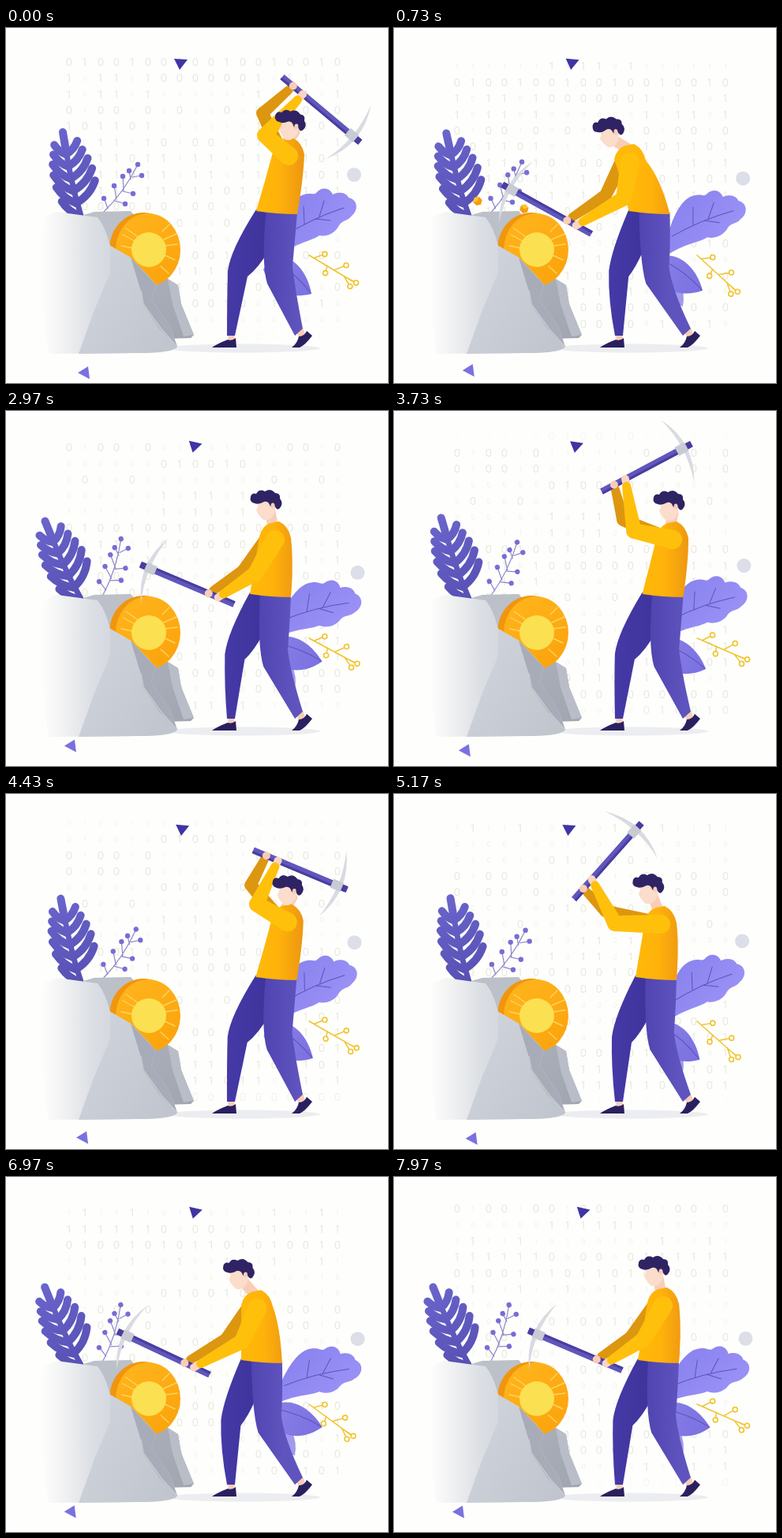
These frames come from a looping animation (484x450 px, 8000 ms). An HTML page with a canvas:

```html
<!DOCTYPE html>
<html lang="en">
<head>
<meta charset="utf-8">
<title>Coin miner</title>
<style>
html, body { margin: 0; width: 100%; height: 100%; overflow: hidden; background: #fefefc; }
canvas { display: block; width: 484px; height: 450px; }
</style>
</head>
<body>
<canvas id="stage" width="484" height="450"></canvas>
<script>
const ctx = document.getElementById('stage').getContext('2d');
const LOOP = 8000, SWING = 5000, TAU = Math.PI * 2, RAD = Math.PI / 180;
const PAPER = '#fefefc';

// time, waist x, neck x y, head x y tilt, handle x y angle, front elbow x y, back elbow x y
const POSES = [
  [0,    343,   355, 143, 361, 116,   8,  350, 62,     40, 328, 136, 325, 108],
  [170,  332,   335, 146, 323, 113,   0,  228, 133,   -48, 280, 164, 268, 148],
  [420,  326,   306, 150, 284, 121,   -6, 243, 252,  -143, 282, 212, 262, 205],
  [730,  323.5, 296, 151, 272, 125,   -8, 250, 261,  -151, 291, 216, 268, 212],
  [2070, 324,   317, 147, 298, 115.5, 0,  259, 250,  -155, 300, 208, 280, 205],
  [2970, 335,   338, 144, 330, 112,   0,  289, 245,  -157, 316, 206, 300, 203],
  [3730, 340.5, 350, 144, 349, 113,   0,  263, 102,   -28, 304, 152, 290, 138]
];

const poseRow = i => {
  const n = POSES.length, turn = Math.floor(i / n);
  const row = POSES[i - turn * n].slice();
  row[0] += turn * SWING;
  return row;
};

// Monotone cubic through the poses, so extremes are never overshot.
function poseAt(t) {
  let i = POSES.length - 1;
  while (POSES[i][0] > t) i--;
  const [a, b, c, d] = [-1, 0, 1, 2].map(k => poseRow(i + k));
  const h = c[0] - b[0], u = (t - b[0]) / h;
  const slope = (p, q, k) => (q[k] - p[k]) / (q[0] - p[0]);
  const tangent = (s1, s2) => s1 * s2 <= 0 ? 0 : 2 * s1 * s2 / (s1 + s2);
  return b.map((v, k) => {
    if (!k) return t;
    const mid = slope(b, c, k);
    const m1 = tangent(slope(a, b, k), mid) * h, m2 = tangent(mid, slope(c, d, k)) * h;
    return v * (1 + 2 * u) * (1 - u) ** 2 + m1 * u * (1 - u) ** 2 +
      c[k] * u * u * (3 - 2 * u) + m2 * u * u * (u - 1);
  });
}

const lerp = (a, b, u) => a + (b - a) * u;
const clamp = v => Math.max(0, Math.min(1, v));
const hash = (a, b) => { const v = Math.sin(a * 127.1 + b * 311.7 + 7) * 43758.5; return v - Math.floor(v); };

function fill(path, color) {
  ctx.fillStyle = color;
  ctx.fill(new Path2D(path));
}
function line(path, color, width = 1) {
  ctx.strokeStyle = color;
  ctx.lineWidth = width;
  ctx.stroke(new Path2D(path));
}
function oval(x, y, rx, ry, color, turn = 0) {
  ctx.fillStyle = color;
  ctx.beginPath();
  ctx.ellipse(x, y, rx, ry, turn, 0, TAU);
  ctx.fill();
}
const disc = (x, y, r, color) => oval(x, y, r, r, color);
function ramp(x1, y1, x2, y2, ...colors) {
  const g = ctx.createLinearGradient(x1, y1, x2, y2);
  colors.forEach((c, i) => g.addColorStop(i / (colors.length - 1), c));
  return g;
}
function turned(x, y, degrees, draw) {
  ctx.save();
  ctx.translate(x, y);
  ctx.rotate(degrees * RAD);
  ctx.translate(-x, -y);
  draw();
  ctx.restore();
}
function taper(a, b, ra, rb, color) {
  const dir = Math.atan2(b[1] - a[1], b[0] - a[0]), q = Math.PI / 2;
  ctx.fillStyle = color;
  ctx.beginPath();
  ctx.arc(a[0], a[1], ra, dir + q, dir - q);
  ctx.arc(b[0], b[1], rb, dir - q, dir + q);
  ctx.fill();
}

function rain(t) {
  const drop = t * 0.0355;
  ctx.textAlign = 'center';
  ctx.textBaseline = 'middle';
  ctx.fillStyle = '#cfcebc';
  for (let col = 0; col < 18; col++) {
    const block = Math.floor(col / 6) % 2, kind = col % 3 === 1 ? 1 : 0;
    const seed = kind + block * 2;
    for (let k = -15; k < 18; k++) {
      const y = 44 + k * 20.4 + drop;
      if (y < 32 || y > 392) continue;
      const lead = k === 0 && seed === 0, big = lead || hash(k, seed) > 0.55;
      ctx.globalAlpha = (big ? 0.45 : 0.28) * clamp((y - 30) / 10) * clamp((394 - y) / 16);
      ctx.font = (big ? 14.5 : 9) + 'px "Open Sans", sans-serif';
      ctx.fillText(lead || hash(k + 40, seed) > 0.45 ? '0' : '1', 80 + col * 20, y);
    }
  }
  ctx.globalAlpha = 1;
}

function floaters(s) {
  const tx = lerp(221, 241, s);
  turned(tx, 44, s * 10, () => fill(`M${tx - 8} 39L${tx + 9} 40L${tx - 1} 53Z`, '#4034a4'));
  const bx = lerp(99, 80, s), by = lerp(437, 423, s);
  fill(`M${bx - 8} ${by}L${bx + 5} ${by - 8}L${bx + 7} ${by + 8}Z`, '#7a70e0');
  disc(lerp(441, 446, s), lerp(186, 207, s), 9, '#dcdee8');
}

function rightPlants(s, t) {
  fill('M338 300Q372 318 366 353Q332 344 330 308Z', '#a09aec');
  turned(340, 290, -23 * s, () => {
    fill('M335 290C360 284 381 305 387 337C360 344 335 334 326 306Z', ramp(335, 290, 387, 337, '#8a80e8', '#7a70e0'));
    line('M340 294Q368 312 386 336', '#5d53b8');
  });
  turned(350, 268, 12 * s, () => {
    fill('M346 266C352 238 362 215 378 211C387 208 390 213 394 208C402 200 411 204 414 211' +
      'C424 206 432 210 434 215C447 218 446 232 438 238C433 245 427 243 422 250' +
      'C417 261 405 265 397 263C385 271 372 271 350 286Z', ramp(360, 210, 430, 260, '#8a82ee', '#9a92f6'));
    line('M352 264Q388 241 428 228M378 248L377 226M397 239L403 219M392 242L411 244', '#5d53b8');
  });
  const sway = 0.5 + 12 * Math.cos(TAU * (t - 1400) / 4500);
  turned(384, 288, sway, () => {
    line('M384 288L437 325M390 292L404 288M406 303L403 312M414 309L430 304M426 317L433 331M430 320L441 327', '#f0c42c', 1.5);
    [[404, 288], [403, 312], [430, 304], [441, 327], [433, 331]].forEach(([x, y]) => {
      disc(x, y, 3.8, '#f0c42c');
      disc(x, y, 2.2, PAPER);
    });
  });
}

function leftPlants(s) {
  turned(95, 238, -14 * s, () => {
    const color = ramp(60, 130, 100, 235, '#6a65cc', '#5850b4');
    line('M95 238Q80 190 73 133', color, 7);
    line('M72 132L75 150', color, 10);
    for (let i = 0; i < 6; i++) {
      const y = 160 + i * 15.5, x = 76 + i * 2.6 + i * i * 0.15, n = Math.min(19 + i * 5, 32);
      const left = i > 4 ? 22 : n * 0.78;
      line(`M${x} ${y}Q${x - left * 0.6} ${y - left * 0.2} ${x - left} ${y - left * 0.8}`, color, 10);
      if (i < 5) line(`M${x} ${y}Q${x + n * 0.55} ${y - n * 0.3} ${x + n * 0.75} ${y - n * 0.9}`, color, 10);
    }
  });
  turned(122, 235, -20 * s, () => {
    line('M122 235Q150 208 167 173M160 189L172 187M158 192L156 181M149 206L148 187M148 207L161 210' +
      'M140 217L137 200M138 219L151 223M129 229L124 215', '#8d86c8', 1.2);
    [[167, 173], [172, 187], [156, 181], [148, 188], [161, 210], [137, 200], [151, 223], [124, 216]]
      .forEach(([x, y]) => disc(x, y, 3.2, '#776dd4'));
  });
}

function coin() {
  oval(174, 280, 43, 46, '#f0960e');
  oval(180, 281, 41, 46, ramp(150, 240, 215, 320, '#ffb41c', '#fba30c'));
  line('M148 262L163 270M152 254L166 264M146 276L160 279M200 268L216 261M202 276L217 274' +
    'M201 288L214 294M198 258L207 249M196 302L206 311', '#ffd45c', 1.4);
  disc(181, 281, 22, '#fbe052');
}

function backRock() {
  fill('M98 237L112 233L158 232L168 244L140 290L110 260Z', '#bcc0c8');
  fill('M172 322L205 318L218 326L222 350L238 389L234 393L200 394Z', ramp(180, 320, 235, 395, '#a9aeb9', '#a0a5b0'));
  fill('M205 318L218 326L222 350L238 389L225 391L211 350Z', '#b9bdc7');
}

function frontRock() {
  fill('M48 240L64 233L116 240Q126 252 132 276L158 291L182 316L190 325L184 344L208 378' +
    'L217 404Q212 412 165 412L54 413Q40 330 48 240Z', ramp(45, 0, 140, 0, PAPER, '#eff0f1', '#dcdfe4', '#d2d6de'));
  fill('M132 276L158 291L182 316L172 334L175 350L198 382L217 404Q212 412 165 412L92 413L111 360L132 310Z',
    ramp(100, 330, 215, 400, '#ced2db', '#c0c5cd'));
  fill('M158 291L190 325L184 344L208 378L217 404L195 382L173 350L171 334Z', '#a7acb8');
  line('M171 333L174 350L197 382L216 403', '#c6cccf', 1.5);
}

function chips(t) {
  const age = (t - 400) / 1000;
  if (age < 0 || age > 0.6) return;
  ctx.globalAlpha = clamp((0.6 - age) * 5);
  [[-133, -115], [45, -85]].forEach(([vx, vy]) => {
    const x = 150 + vx * age, y = 230 + vy * age + 250 * age * age;
    turned(x, y, vx * age, () => {
      fill(`M${x - 5} ${y - 3}L${x} ${y - 6}L${x + 5} ${y - 3}V${y + 3}L${x} ${y + 6}L${x - 5} ${y + 3}Z`, '#f0a00c');
      fill(`M${x - 5} ${y - 3}L${x} ${y - 6}L${x + 5} ${y - 3}L${x} ${y}Z`, '#fbc634');
    });
  });
  ctx.globalAlpha = 1;
}

function pick(x, y, angle) {
  ctx.save();
  ctx.translate(x, y);
  ctx.rotate(angle * RAD);
  fill('M0 -4H128V4H0Z', '#6056bc');
  fill('M0 1H128V4H0Z', '#483e9f');
  fill('M109 -45Q134 0 109 45Q123 0 109 -45Z', '#d9dbe2');
  fill('M108 -6H122V6H108Z', '#c8cad4');
  fill('M122 -4H129V4H122Z', '#483e9f');
  ctx.restore();
}

function legs(w) {
  const shift = w - 343, lk = 281 + shift * 0.45, rk = 363 + shift * 0.75, ik = 326 + shift * 0.6;
  const skin = '#f8cdb8', shoe = '#2a2060';
  fill('M281 386H290L289 398H282Z', skin);
  fill('M367 384L376 380L380 390L372 394Z', skin);
  fill('M261 405Q268 400 281 395Q286 397 291 393L292 405Z', shoe);
  fill('M362 405Q369 400 371 391Q378 391 381 384L388 390Q379 402 372 405Z', shoe);
  fill(`M${w - 26} 230Q${lk + 3} 282 ${lk} 308Q${lk - 1} 345 280 390H290L${lk + 25} 315Q${w - 8} 292 ${w + 10} 232Z`,
    ramp(lk, 300, w + 5, 300, '#4539a6', '#3d3298'));
  fill(`M${w - 13} 229L${w + 26} 234Q${rk + 2} 280 ${rk} 302Q${rk + 3} 330 376 381L366 390L${ik + 5} 324Q${ik - 3} 298 ${w - 13} 229Z`,
    ramp(w - 18, 0, w + 28, 0, '#4f43b0', '#5f54be'));
}

function head(x, y, tilt) {
  turned(x, y, tilt, () => {
    ctx.save();
    ctx.translate(x, y);
    fill('M-10 -2L-11 9L-13 14Q-9 22 -4 26Q5 28 10 18L13 4L4 -5Z', '#fcdcca');
    fill('M-15 5Q-22 4 -20 -4Q-18 -9 -13 -7Q-9 -14 -2 -10Q5 -15 11 -8Q18 -8 17 -1Q22 5 17 11Q14 14 12 11' +
      'L8 5Q6 12 4 7Q2 2 -3 3Q-10 7 -15 5Z', '#2f2364');
    oval(8, 8, 2.5, 3.5, '#f8cdb8');
    ctx.restore();
  });
}

function torso(w, x, y) {
  fill(`M${w - 26} 232Q${lerp(w - 26, x - 16, 0.5)} 195 ${x - 17} ${y + 15}Q${x - 14} ${y + 2} ${x - 3} ${y - 2}` +
    `L${x + 8} ${y - 4}Q${x + 20} ${y + 2} ${x + 23} ${y + 17}Q${lerp(x + 29, w + 27, 0.5)} 190 ${w + 26} 236Q${w} 236 ${w - 26} 232Z`,
    ramp(w - 26, 0, w + 32, 0, '#ffb908', '#ffb20a', '#ee9812'));
}

function miner(t) {
  const [, w, nx, ny, hx, hy, tilt, px, py, angle, fx, fy, bx, by] = poseAt(t % SWING);
  const raised = clamp((angle + 130) / 70);
  const grip = d => [px + Math.cos(angle * RAD) * d, py + Math.sin(angle * RAD) * d];
  const front = grip(lerp(22, 34, raised)), back = grip(lerp(35, 18, raised));
  const arm = (shoulder, elbow, hand, r, color) => {
    const wrist = [lerp(elbow[0], hand[0], 0.86), lerp(elbow[1], hand[1], 0.86)];
    taper(wrist, hand, 4.5, 5, '#fbd5c2');
    taper(shoulder, elbow, r, r * 0.82, color);
    taper(elbow, wrist, r * 0.82, 5.5, color);
  };
  arm([nx - 6, ny + 17], [bx, by], back, 9.5, '#dd960f');
  legs(w);
  taper([hx + 5, hy + 16], [nx, ny + 2], 6.5, 7, '#f8cdb8');
  torso(w, nx, ny);
  pick(px, py, angle);
  disc(back[0], back[1], 5, '#f8cdb8');
  arm([nx + 3, ny + 19], [fx, fy], front, 12, '#ffc00c');
  head(hx, hy, tilt);
}

function draw(t) {
  const sway = (1 - Math.cos(TAU * (t + 50) / SWING)) / 2;
  ctx.fillStyle = PAPER;
  ctx.fillRect(0, 0, 484, 450);
  ctx.lineCap = ctx.lineJoin = 'round';
  rain(t);
  floaters(sway);
  rightPlants(sway, t);
  oval(300, 406, 98, 5.5, '#ecedf0');
  leftPlants(sway);
  backRock();
  coin();
  frontRock();
  chips(t % SWING);
  miner(t);
}

const start = performance.now();
function frame(now) {
  draw(Math.max(0, now - start) % LOOP);
  requestAnimationFrame(frame);
}
draw(0);
requestAnimationFrame(frame);
</script>
</body>
</html>
```
